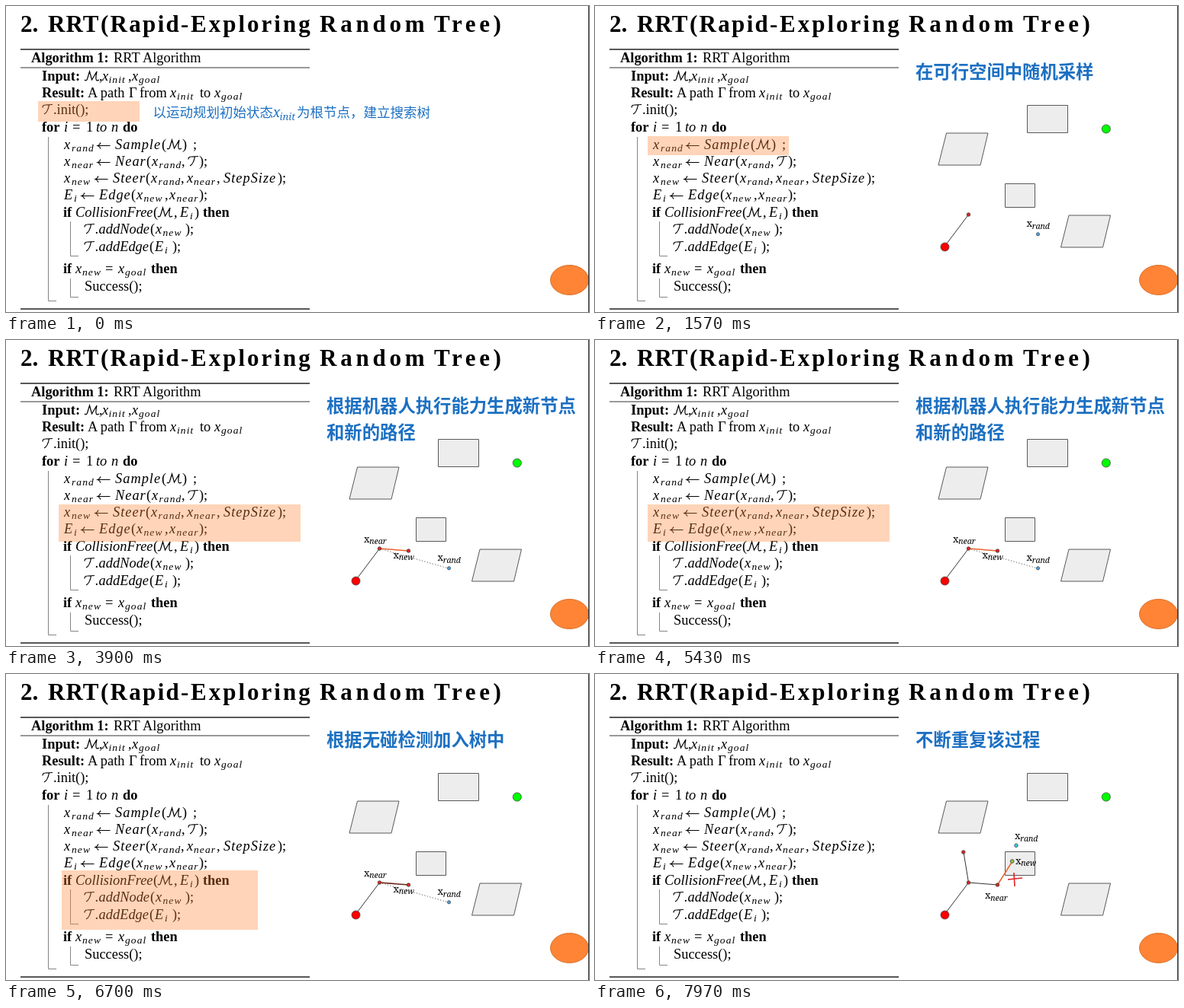
Animation of 764x402 px, one loop 8 s. Source, as an HTML page:

```html
<!DOCTYPE html>
<html lang="zh">
<head>
<meta charset="utf-8">
<style>
html, body { margin: 0; width: 100%; height: 100%; overflow: hidden; background: #fff; }
svg { display: block; width: 764px; height: 402px; }
text { font: 18.4px "Liberation Serif", serif; white-space: pre; }
.title { font-size: 31px; font-weight: bold; }
.b { font-weight: bold; }
.t, .i, .s { font-style: italic; }
.i { letter-spacing: 1px; }
.s { font-size: 13.5px; letter-spacing: 1.1px; }
.c { fill: none; stroke: #000; stroke-width: 1.2; }
.big, .note { font-family: "Noto Sans CJK SC", "Noto Sans CJK", sans-serif; fill: #1c70c2; }
.big { font-size: 23.35px; font-weight: bold; }
.note { font-size: 17.5px; }
.var, .sub { font: 13px "Noto Serif", serif; }
.sub { font-size: 10.5px; font-style: italic; }
.blue { fill: #1c70c2; font-style: italic; }
.mark { fill: #ff8435; opacity: .35; }
.box { fill: #ededed; stroke: #595959; }
.guide { fill: none; stroke: #858585; }
.edge { stroke: #333; }
.hot { stroke: #e8602c; stroke-width: 1.5; }
.done { stroke: #6a2415; stroke-width: 1.6; }
.dots { stroke: #555; stroke-dasharray: 1.2 2.4; }
.cross { stroke: #e02020; stroke-width: 1.6; fill: none; }
</style>
</head>
<body>
<svg id="stage" viewBox="0 0 764 402"></svg>
<script>
const text = (x, y, s, cls, more = '') => `<text x="${x}" y="${y}" class="${cls}" ${more}>${s}</text>`;
const path = (d, cls, more = '') => `<path d="${d}" class="${cls}" ${more}/>`;
const line = (a, b, cls) => path(`M${a}L${b}`, cls);
const dot = (x, y, r, fill) => `<circle cx="${x}" cy="${y}" r="${r}" fill="${fill}" stroke="#444" stroke-width=".8"/>`;
const mark = (x, y, x2, y2) => `<rect x="${x}" y="${y}" width="${x2 - x}" height="${y2 - y}" class="mark"/>`;
const label = (x, y, s) => text(x, y, 'x', 'var') + text(x + 7.3, y + 2.5, s, 'sub');
const big = (...rows) => rows.map((s, i) => text(420, 95 + 35 * i, s, 'big')).join('');

// Calligraphic capitals and the long arrow
const glyphs = {
  M: 'M0-1Q2 1 3.5-2L6.5-12L9.5-1L16-12Q14-3 15.5-.5Q17 .5 19-1',
  T: 'M1-8.5Q1-12 4.5-12L14-12.5M9.5-12Q7.5-2 3 0',
  '←': 'M1-4.5H17.5M5-8.5Q4-5.5 1-4.5Q4-3.5 5-.5'
};

// Each piece: style letter, x, text (r roman, b bold, i/t italic, s subscript, c drawn glyph)
const code = {
  74: 'b33 Algorithm 1:|r141 RRT Algorithm',
  98: 'b47 Input:|c103 M|r122 ,|i126 x|s134.5 init|r160 ,|i165 x|s174 goal',
  120: 'b47 Result:|r107 A path|r161 Γ|r175 from|i215 x|s224 init|r254 to|i273 x|s282 goal',
  142: 'c47 T|r62 .init();',
  165: 'b47 for|i76 i|r87 =|r105 1|t118 to|i138 n|b153 do',
  188: 'i76 x|s86 rand|c119 ←|i143 Sample|r204 (|c211 M|r231 )|r245 ;',
  210: 'i76 x|s86 near|c119 ←|i143 Near|r184 (|i191 x|s200.5 rand|r230 ,|c238 T|r253 );',
  232: 'i76 x|s86 new|c116 ←|i140 Steer|r183 (|i190 x|s199.5 rand|r229 ,|i237 x|s246 near|r276 ,|i285 StepSize|r356 );',
  254: 'i76 E|s89 i|c98 ←|i122 Edge|r164 (|i171 x|s180.5 new|r208 ,|i214 x|s223.5 near|r253 );',
  277: 'b75 if|t91 CollisionFree|r193 (|c199 M|r220 ,|i228 E|s241 i|r247 )|b258 then',
  299: 'c102 T|t117 .addNode|r189 (|i196 x|s205.5 new|r235 );',
  322: 'c102 T|t117 .addEdge|r188 (|i195 E|s208 i|r218 );',
  351: 'b75 if|i91 x|s100 new|r130 =|i147 x|s156 goal|b190 then',
  374: 'r103 Success();'
};
const piece = (p, y) => {
  const [, cls, x, s] = p.match(/^(\w)([\d.]+) (.*)$/);
  return cls === 'c' ? path(glyphs[s], 'c', `transform="translate(${x} ${y})"`)
    : text(x, cls === 's' ? +y + 2.5 : y, s, cls);
};

const title = [[19, '2.', 0], [55, 'RRT', 1], [124, '(Rapid-', 2.3], [242, 'Exploring', 3],
  [411, 'Random', 4.8], [561, 'Tree)', 4.6]];

const base =
  title.map(([x, s, gap]) => text(x, 34, s, 'title', `letter-spacing="${gap}"`)).join('') +
  Object.entries(code).map(([y, row]) => row.split('|').map(p => piece(p, y)).join('')).join('') +
  path('M19 57H398M19 398H398', '', 'stroke="#222" stroke-width="1.7"') +
  path('M19 81H398', '', 'stroke="#333"') +
  path('M55.5 172V387.5H66M84.5 283V328.5H95M84.5 358V382.5H95', 'guide') +
  '<ellipse cx="738.5" cy="360" rx="25" ry="19.5" fill="#ff8435" stroke="#d9722f"/>' +
  path('M763.5 0V402', '', 'stroke="#333"');

const start = '461,312', near = '489.5,274', next = '527.5,277', goal = '547,246';
const rand = dot(580.5, 299.8, 2.1, '#4aa3e8') + label(565.5, 290, 'rand');
const nearNode = dot(489.5, 274, 2.3, '#e02020');
const nextNode = dot(527.5, 277, 2.3, '#e02020');
const world =
  path('M566.5 130.5h53v36h-53zM460.5 167H515L505 209H450zM537.5 233.5h39v31h-39zM621 275H675.5L665.5 317H610.5z', 'box') +
  dot(669.8, 161.5, 5.6, '#0f0') + line(start, near, 'edge') + dot(458.5, 316.5, 5.5, '#f00');
const search = world + line(near, '580,300', 'dots') + rand + label(469, 265.5, 'near');
const steer = cls => search + line(near, next, cls) + nearNode + nextNode + label(507.5, 286.5, 'new');

const scenes = [
  [0, text(192.5, 146, '以运动规划初始状态', 'note') +
    text(349.5, 146, 'x', 'var blue', 'style="font-size:18px"') +
    text(358.5, 150, 'init', 'sub blue', 'style="font-size:13px"') +
    text(381, 146, '为根节点，建立搜索树', 'note') + mark(42, 125, 175, 152)],
  [500, big('在可行空间中随机采样') + world + nearNode + rand + mark(69, 171, 254, 196)],
  [2570, big('找到树中离采样点最近的树节点') + search + nearNode + mark(69, 193, 284, 217)],
  [3900, big('根据机器人执行能力生成新节点', '和新的路径') + steer('hot') + mark(69, 216, 386, 265)],
  [5700, big('根据无碰检测加入树中') + steer('done') + mark(73, 258, 330, 336)],
  [7030, big('不断重复该过程') + world + line('483,234', near, 'edge') + line(near, next, 'edge') +
    line(next, goal, 'hot') + nearNode + nextNode + dot(482.8, 234, 2.3, '#e02020') +
    dot(546.7, 246, 2.4, '#8cc63c') + dot(552, 225.3, 2.3, '#35cdf0') +
    label(550, 217, 'rand') + label(551, 249.5, 'new') + label(511, 295, 'near') +
    path('M541 270L560 268M549 261L550 279', 'cross')]
];

const stage = document.getElementById('stage');
stage.innerHTML = base + scenes.map(([, art]) => `<g class="scene">${art}</g>`).join('');
const groups = stage.querySelectorAll('.scene');
const origin = performance.now();

function draw() {
  const time = (performance.now() - origin) % 8000;
  const current = scenes.filter(([from]) => from <= time).length - 1;
  groups.forEach((g, i) => g.style.display = i === current ? '' : 'none');
  requestAnimationFrame(draw);
}
draw();
</script>
</body>
</html>
```
